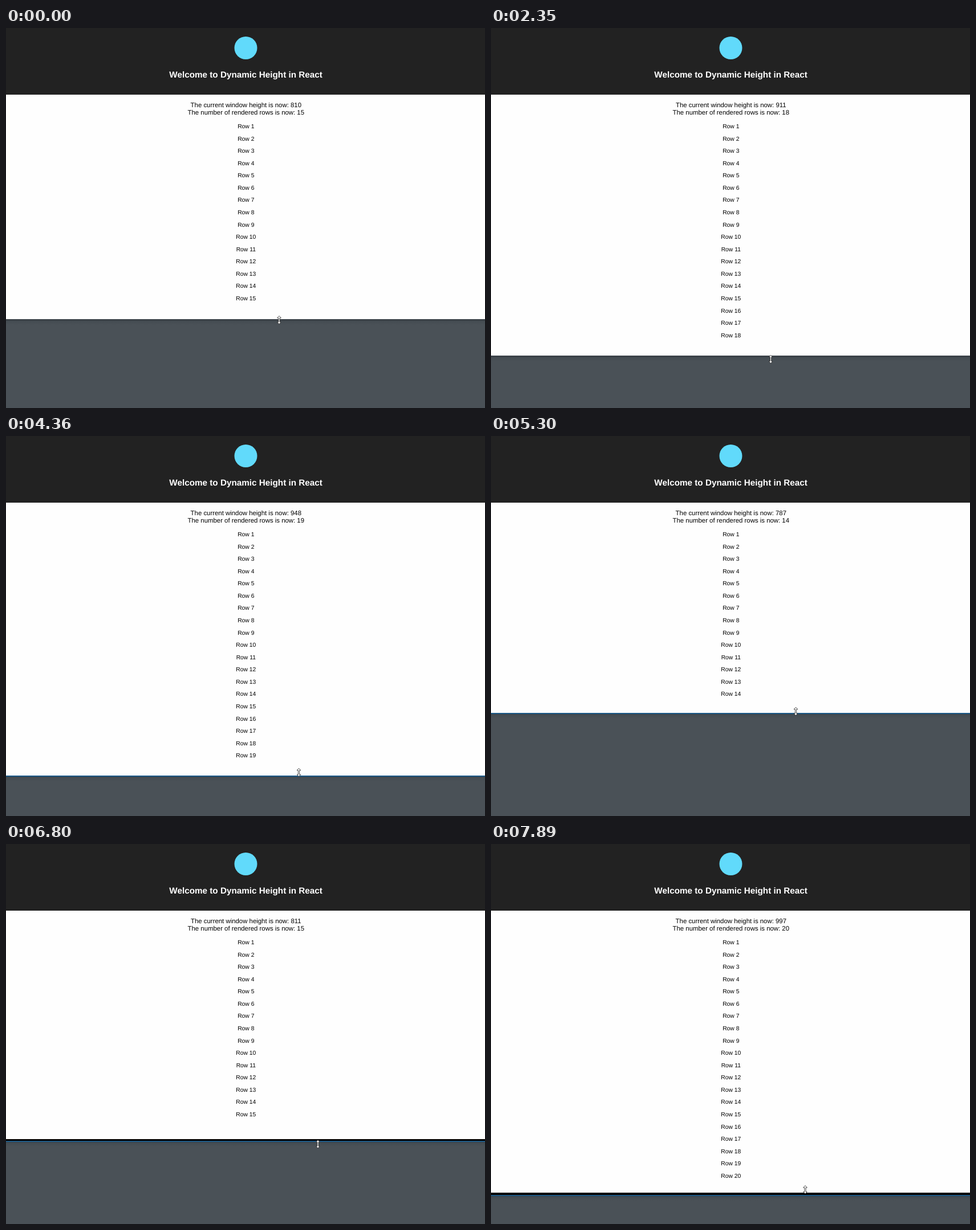
An HTML page that plays this animation: 840 by 667 pixels, repeating every 8000 ms.

```html
<!DOCTYPE html>
<html lang="en">
<head>
<meta charset="utf-8">
<title>Dynamic height</title>
<style>
  html, body { margin: 0; width: 100%; height: 100%; overflow: hidden; background: #4a5157; }
  svg { display: block; width: 100%; height: 100%; }
  text {
    font-family: "Liberation Sans", Arial, sans-serif;
    text-anchor: middle;
    text-rendering: geometricPrecision;
  }
  .title { font-size: 15.28px; font-weight: bold; fill: #fff; }
  .info { font-size: 11.4px; }
  .row { font-size: 10.35px; }
</style>
</head>
<body>
<svg viewBox="0 0 840 667" preserveAspectRatio="none">
  <defs>
    <linearGradient id="fade" x2="0" y2="1">
      <stop offset="0" stop-color="#333c42" stop-opacity=".4"/>
      <stop offset="1" stop-color="#333c42" stop-opacity="0"/>
    </linearGradient>
  </defs>
  <rect width="840" height="667" fill="#4a5157"/>
  <rect id="page" width="840" fill="#fefefe"/>
  <rect width="840" height="117" fill="#222"/>
  <circle cx="420.5" cy="35" r="20" fill="#61dafb"/>
  <text class="title" x="420.6" y="87.3">Welcome to Dynamic Height in React</text>
  <text class="info" id="heightText" x="420.8" y="139"></text>
  <text class="info" id="countText" x="420.8" y="152.4"></text>
  <g id="rows"></g>
  <rect id="gap" width="840" fill="#000"/>
  <g id="border">
    <rect width="840" height="10" fill="url(#fade)"/>
    <rect width="840" height="3" fill="#3b4248"/>
    <rect id="accent" width="840" height="2" fill="#1d5a88"/>
  </g>
  <path id="cursor" fill="#fff" stroke="#222" stroke-width=".8" stroke-linejoin="round"
    d="M0-7.2 3.4-3.6H1.1V3.6H3.4L0 7.2-3.4 3.6H-1.1V-3.6H-3.4Z"/>
</svg>
<script>
const LOOP = 8000;
const REFRESH = 135;
const ACCENT_FROM = 3410;
const $ = id => document.getElementById(id);

// Turning points of the drag: time, page edge, reported height, cursor x
const drag = [
  [0, 511, 810, 479],
  [1540, 511, 810, 479],
  [3130, 639, 1011, 502],
  [3410, 652, 1030, 505],
  [4360, 596, 948, 513.5],
  [5300, 486, 787, 534.5],
  [5960, 440, 717, 541],
  [6800, 518, 811, 547],
  [7730, 630, 1000, 550],
  [7890, 612, 997, 551]
];

// Moves between turning points in even screen refreshes.
function sample(t) {
  const next = drag.findIndex(p => p[0] > t);
  const i = next < 0 ? drag.length - 1 : next;
  const a = drag[i - 1], b = drag[i];
  const span = b[0] - a[0];
  const steps = Math.round(span / REFRESH);
  const k = Math.min(1, Math.floor((t - a[0]) / span * steps) / steps);
  const [, edge, height, x] = a.map((v, j) => v + (b[j] - v) * k);
  return { edge: Math.round(edge), height: Math.round(height), x, speed: (b[1] - a[1]) / span };
}

const rows = Array.from({ length: 24 }, (_, i) => {
  const row = document.createElementNS("http://www.w3.org/2000/svg", "text");
  row.setAttribute("class", "row");
  row.setAttribute("x", 420.8);
  row.setAttribute("y", 176 + i * 21.57);
  row.textContent = "Row " + (i + 1);
  $("rows").append(row);
  return row;
});

function draw(t) {
  const { edge, height, x, speed } = sample(t);
  const count = Math.floor(height / 35 - 8);
  // A page that has not caught up with its window leaves a black strip.
  const lag = Math.abs(edge - (height * 0.674 - 42.5));
  const gap = lag > 10 ? Math.round(lag / 4) : 0;
  // The pointer runs slightly ahead of the edge it pulls.
  const y = edge + 1.5 + speed * 60;

  $("page").setAttribute("height", edge);
  $("gap").setAttribute("y", edge);
  $("gap").setAttribute("height", gap);
  $("border").setAttribute("transform", `translate(0 ${edge + gap})`);
  $("accent").setAttribute("opacity", t < ACCENT_FROM ? 0 : 1);
  $("cursor").setAttribute("transform", `translate(${x} ${y})`);
  $("heightText").textContent = "The current window height is now: " + height;
  $("countText").textContent = "The number of rendered rows is now: " + count;
  rows.forEach((row, i) => row.setAttribute("visibility", i < count ? "visible" : "hidden"));
}

function tick() {
  draw(performance.now() % LOOP);
  requestAnimationFrame(tick);
}
tick();
</script>
</body>
</html>
```
